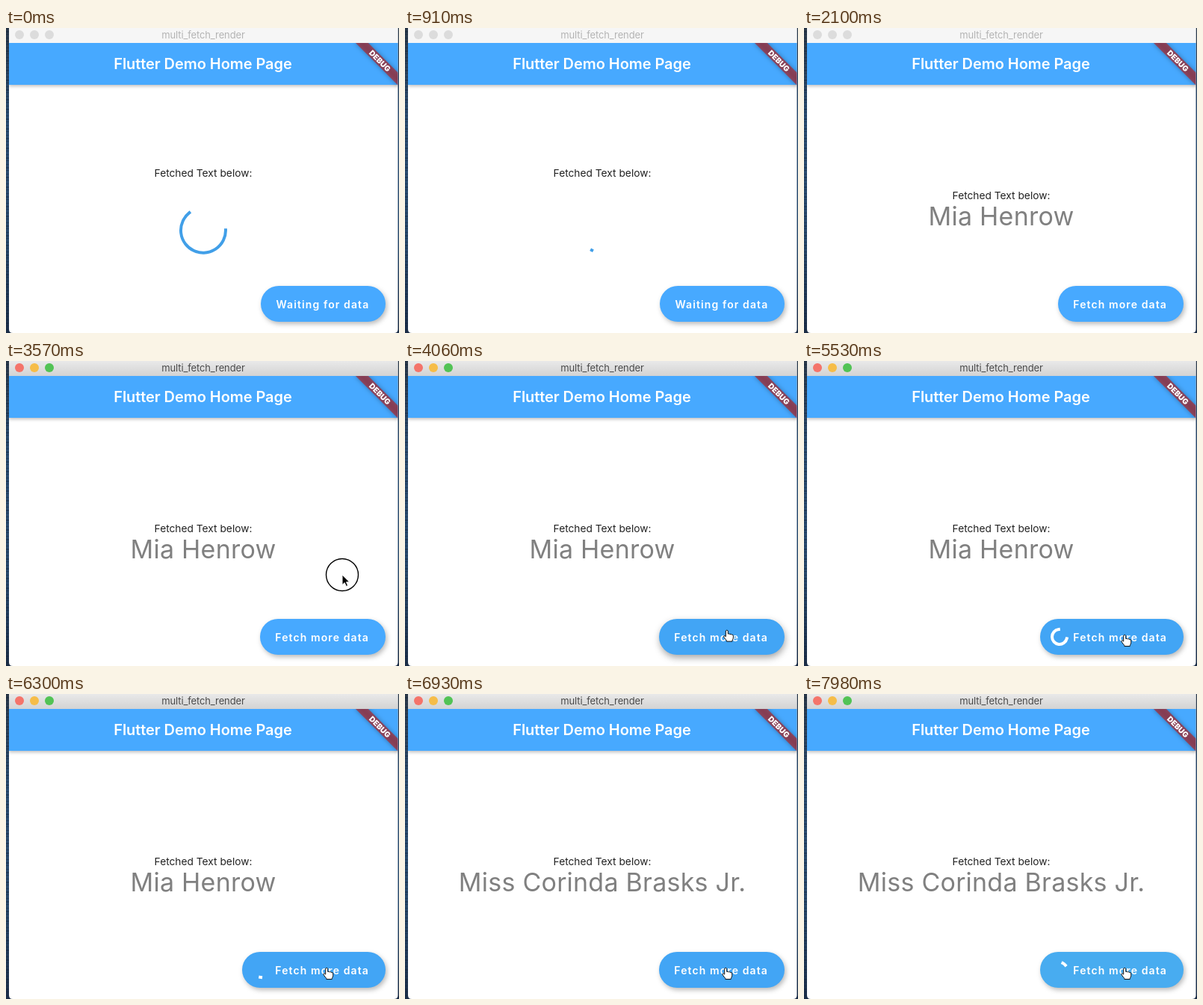
Write an HTML page that moves like this. It is 526 px wide and 408 px high and loops after 8000 ms.

```html
<!DOCTYPE html>
<html lang="en">
<head>
<meta charset="utf-8">
<title>multi_fetch_render</title>
<style>
  html, body { margin: 0; width: 100%; height: 100%; overflow: hidden; }
  svg { display: block; width: 526px; height: 408px; font-family: Inter, Roboto, sans-serif; }
  .mid { text-anchor: middle; }
  #bar { filter: drop-shadow(0 2px 2px rgba(0, 0, 0, .25)); }
  #fab { filter: drop-shadow(2px 3px 3px rgba(0, 0, 0, .27)); }
  #fab.raised { filter: drop-shadow(1px 4px 5px rgba(0, 0, 0, .35)); }
  #ribbon { filter: drop-shadow(0 0 3px rgba(0, 0, 0, .5)); }
  .arc { fill: none; stroke-width: 4; stroke-linecap: square; }
</style>
</head>
<body>
<svg viewBox="0 0 526 408">
  <defs>
    <linearGradient id="desk" x2="0" y2="1">
      <stop offset="0" stop-color="#2a3848"/>
      <stop offset=".3" stop-color="#2b4d72"/>
      <stop offset=".7" stop-color="#28496c"/>
      <stop offset="1" stop-color="#1b2d47"/>
    </linearGradient>
    <linearGradient id="chrome" x2="0" y2="1">
      <stop offset="0" stop-color="#e9e9e9"/>
      <stop offset="1" stop-color="#d3d3d3"/>
    </linearGradient>
    <clipPath id="win"><path d="M4 0H524.5V403q0 5-5 5H9q-5 0-5-5Z"/></clipPath>
    <clipPath id="page"><rect y="20" width="526" height="388"/></clipPath>
  </defs>

  <rect width="526" height="408" fill="url(#desk)"/>
  <path d="M2 0V408" stroke="#13233a" stroke-width="4" stroke-dasharray="1 3 2 2 1 4" opacity=".4"/>
  <g clip-path="url(#win)">
    <rect width="526" height="408" fill="#fff"/>
    <g id="bar"><rect x="4" y="20" width="521" height="56" fill="#47a9ff"/></g>
    <rect id="titlebar" width="526" height="20"/>
    <g id="lights">
      <circle cx="18" cy="9" r="6"/>
      <circle cx="38" cy="9" r="6"/>
      <circle cx="58" cy="9" r="6"/>
    </g>
    <text id="title" class="mid" x="264" y="14" font-size="13" letter-spacing="-.13">multi_fetch_render</text>
    <text class="mid" x="263.5" y="55" font-size="20" font-weight="600" letter-spacing="-.06" fill="#fff">Flutter Demo Home Page</text>
    <g clip-path="url(#page)">
      <g transform="translate(524.5 20) rotate(45)">
        <g id="ribbon"><rect x="-40" y="28" width="80" height="12" fill="#b71c1c" fill-opacity=".63"/></g>
        <text class="mid" y="37.7" font-size="10.2" font-weight="900" fill="#fff">DEBUG</text>
      </g>
    </g>
    <text id="caption" class="mid" x="264" font-size="13.75" fill="#222">Fetched Text below:</text>
    <text id="name" class="mid" x="264" y="264" font-size="34" letter-spacing=".25" fill="#808080"></text>
    <path id="loader" class="arc" stroke="#419fe8"/>
    <g id="fab"><rect id="pill" y="345" height="48" rx="24"/></g>
    <text id="label" y="375" font-size="14" font-weight="600" letter-spacing="1.1" fill="#fff"></text>
    <path id="fabLoader" class="arc" stroke="#fff"/>
  </g>
  <g id="cursor">
    <circle id="press" r="21.5" fill="none" stroke="#000" stroke-width="1.4"/>
    <path id="arrow" d="M0 0V13.5L3.2 10.6 5.3 15.4 7.6 14.4 5.5 9.8H9.8Z" fill="#000" stroke="#fff"/>
    <path id="hand" d="M-1.6 .8Q0-1 1.4 .8V5Q3 4.2 4 5.4 5.6 4.8 6.4 6 8.2 5.6 8.4 7.4V10Q8.2 12 7 14V15H-.5V14Q-2 12-4.2 9.2-4.8 7.2-3 7.4L-1.6 8.6Z" fill="#fff" stroke="#111"/>
  </g>
</svg>
<script>
const LOOP = 8000, STEP = 70;
const FIRST_DATA = 1470, ACTIVE = 3430, FETCH = 5080, SECOND_DATA = 6860, REFETCH = 7865;
const SPLASH = 200;
const PRESSES = [[3430, 3700], [4970, 5060], [7770, 7850]];
const PATH = [[3010, 530, 335], [3290, 450, 286], [3780, 450, 286], [4200, 429.3, 366.5]];
const LIGHTS = ["#f4746a", "#f6bd48", "#52c355"];

const $ = id => document.getElementById(id);
const set = (id, attrs) => {
  for (const k in attrs) $(id).setAttribute(k, attrs[k]);
};
const show = (id, on) => set(id, { visibility: on ? "visible" : "hidden" });
const clamp = v => Math.min(1, Math.max(0, v));

// cubic-bezier(.4, 0, .2, 1), solved by bisection
function ease(x) {
  let lo = 0, hi = 1, s = .5;
  for (let i = 0; i < 20; i++) {
    s = (lo + hi) / 2;
    const bx = 1.2 * (1 - s) ** 2 * s + .6 * (1 - s) * s * s + s ** 3;
    if (bx < x) lo = s; else hi = s;
  }
  return 3 * (1 - s) * s * s + s ** 3;
}

// Material indeterminate spinner: head grows, then tail catches up, while it all turns
function spinner(id, age, cx, cy, r) {
  const p = age / 1333 % 1;
  const head = ease(clamp(p * 2)), tail = ease(clamp(p * 2 - 1));
  const from = Math.PI * (-.5 + 1.5 * tail + 2 * (age / 2222 % 1) + .5 * p);
  const sweep = Math.max(1.5 * Math.PI * (head - tail), .001);
  const at = a => `${cx + r * Math.cos(a)} ${cy + r * Math.sin(a)}`;
  set(id, { d: `M${at(from)}A${r} ${r} 0 ${+(sweep > Math.PI)} 1 ${at(from + sweep)}` });
}

function cursorAt(t) {
  let i = PATH.findIndex(k => k[0] > t);
  if (i < 0) i = PATH.length;
  const a = PATH[Math.max(0, i - 1)], b = PATH[Math.min(i, PATH.length - 1)];
  const f = a === b ? 0 : ease((t - a[0]) / (b[0] - a[0]));
  return [a[1] + (b[1] - a[1]) * f, a[2] + (b[2] - a[2]) * f];
}

function draw(t) {
  const waiting = t < FIRST_DATA, active = t >= ACTIVE;
  const fetching = t >= FETCH && t < SECOND_DATA || t >= REFETCH;
  const pressed = (extra = 0) => PRESSES.some(([a, b]) => t >= a && t < b + extra);

  set("titlebar", { fill: active ? "url(#chrome)" : "#f6f6f6" });
  set("title", { fill: active ? "#4a4a4a" : "#b4b4b4" });
  [...$("lights").children].forEach((c, i) => c.setAttribute("fill", active ? LIGHTS[i] : "#dcdcdc"));

  set("caption", { y: waiting ? 198.5 : 228.5 });
  $("name").textContent = waiting ? "" : t < SECOND_DATA ? "Mia Henrow" : "Miss Corinda Brasks Jr.";
  show("loader", waiting);
  spinner("loader", t + 388, 264, 270.7, 30);

  const visible = t >= PATH[0][0];
  const [x, y] = visible ? cursorAt(t) : [0, 0];
  const over = y > 347;
  const left = waiting ? 341 : fetching ? 316 : 340;
  const fill = !over ? "#47a9ff" : pressed(SPLASH) ? "#48acf0" : "#42a5f5";
  set("pill", { x: left, width: 508 - left, fill });
  $("fab").classList.toggle("raised", over && t < FETCH);
  set("label", { x: waiting ? 361.5 : 360.3 });
  $("label").textContent = waiting ? "Waiting for data" : "Fetch more data";
  show("fabLoader", fetching);
  if (fetching) spinner("fabLoader", t - (t < SECOND_DATA ? FETCH : REFETCH), 342, 369, 10);

  set("cursor", { transform: `translate(${x} ${y})` });
  show("arrow", visible && !over);
  show("hand", visible && over);
  show("press", pressed());
}

const start = performance.now();
function tick() {
  const t = (performance.now() - start) % LOOP;
  draw(Math.floor(t / STEP) * STEP);
  requestAnimationFrame(tick);
}
tick();
</script>
</body>
</html>
```
